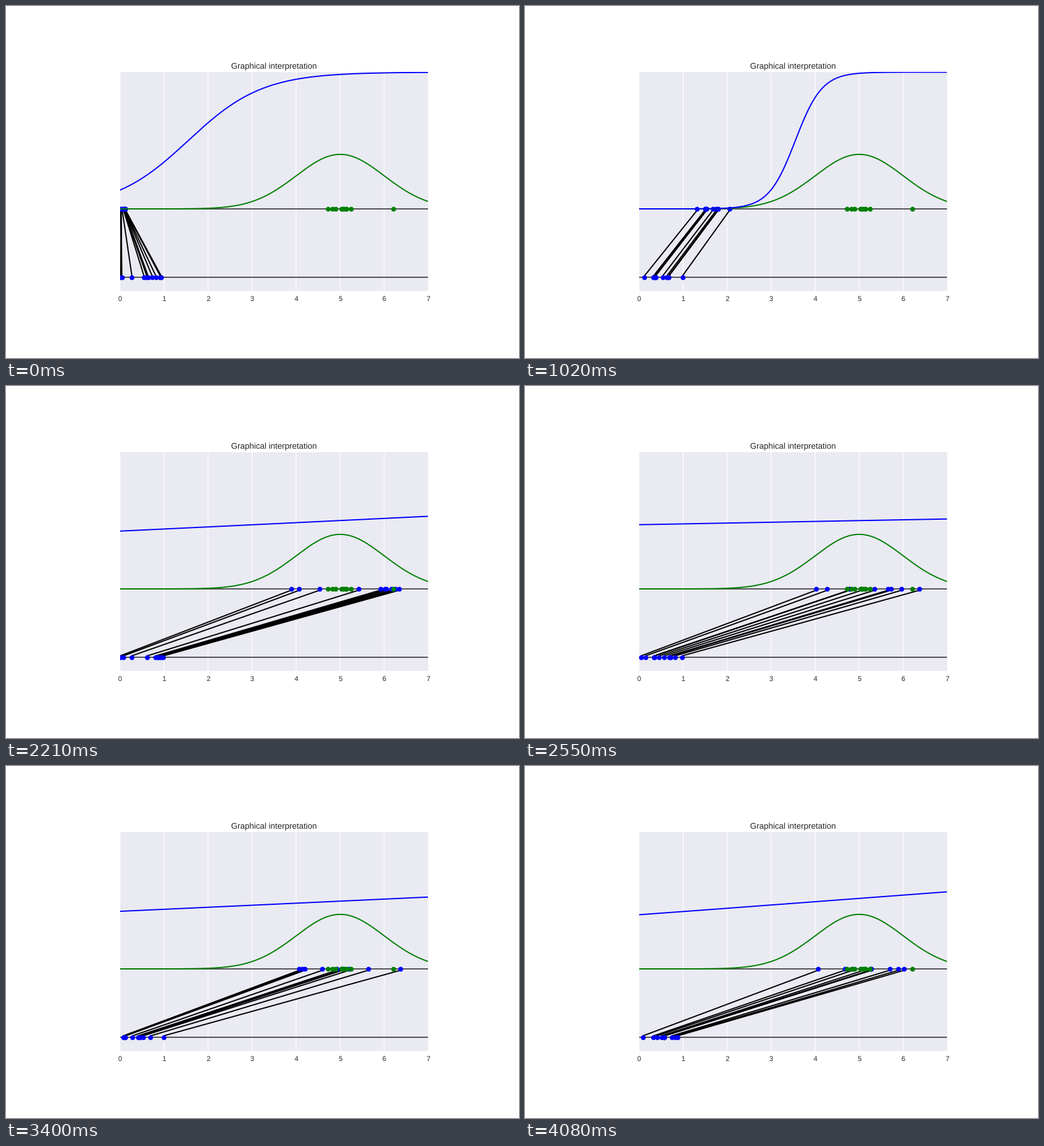
A matplotlib script that plays this animation: 800x550 px, repeating every 4.25 s.

```python
import numpy as np
import matplotlib.pyplot as plt
from matplotlib.animation import FuncAnimation

W, H, DPI = 800, 550, 100
FRAMES, STEP = 25, 170
LEFT, RIGHT, TOP, BOTTOM = 177.8, 658.5, 103.4, 445.2
LATENT_Y, GAP = -0.5, 0.01
SAMPLES = 10
BLUE, GREEN, INK = "#0000FF", "#008000", "0.15"

plt.rcParams["font.family"] = "Liberation Sans"
plt.rcParams["text.hinting"] = "none"


def pt(px):
    return px * 72 / DPI


def latent(step):
    return np.sort(np.random.default_rng(step).random(SAMPLES))


def generate(z, step):
    """Affine generator: climbs to the real data, then sways around it."""
    if step < 10:
        shift = np.interp(step, [0, 3, 6, 10], [0.02, 0.41, 1.215, 3.85])
    else:
        shift = 3.885 - 0.035 * np.cos(2 * np.pi * (step - 10) / 14)
    return shift + (0.1 + 0.62 * shift) * z


def discriminate(x, step):
    """Logistic curve: sharpens, chases the fakes, then goes nearly flat."""
    center = np.interp(step, [0, 3, 6, 10, 20, 24],
                       [1.55, 2.955, 3.55, 4.87, 5.3, 4.35])
    steepness = np.interp(step, [0, 3, 6, 8, 10, 15, 17, 20, 24],
                          [1.185, 3.25, 3.3, 2.7, 0.12, 0.024, 0.13, 0.06, 0.097])
    return 1 / (1 + np.exp(-steepness * (x - center)))


fig = plt.figure(figsize=(W / DPI, H / DPI), dpi=DPI, facecolor="white")
ax = fig.add_axes([LEFT / W, 1 - BOTTOM / H,
                   (RIGHT - LEFT) / W, (BOTTOM - TOP) / H])
ax.set_facecolor("#EAEAF2")
ax.patch.set_snap(False)
ax.set(xlim=(0, 7), ylim=(-0.6, 1), xticks=[], yticks=[])
ax.spines[:].set_visible(False)


def label(x, baseline, text, px):
    fig.text(x / W, 1 - baseline / H, text, size=pt(px), color=INK,
             ha="center", va="baseline")


def dots(x, y, color, z):
    return ax.plot(x, y, "o", color=color, ms=pt(7.6), mew=0, zorder=z)[0]


def curve(x, y, color, z):
    return ax.plot(x, y, color=color, lw=pt(1.9), zorder=z,
                   solid_capstyle="butt")[0]


label((LEFT + RIGHT) / 2, 98.2, "Graphical interpretation", 12.9)
for tick in range(8):
    label(LEFT + tick * (RIGHT - LEFT) / 7, 461.3, str(tick), 10.8)
    ax.axvline(tick, color="white", lw=pt(1.1), zorder=0.5, snap=False)
for y in (0, LATENT_Y):
    ax.axhline(y, color="black", lw=pt(1.25), zorder=1, snap=False)

x = np.linspace(0, 7, 400)
real = [4.72, 4.83, 4.89, 5.02, 5.05, 5.08, 5.13, 5.15, 5.25, 6.21]
links = curve([], [], "black", 2)
noise = dots([], [], BLUE, 3)
fakes = dots([], [], BLUE, 3)
dots(real, np.zeros(len(real)), GREEN, 4)
curve(x, np.exp(-(x - 5) ** 2 / 2) / np.sqrt(2 * np.pi), GREEN, 5)
score = curve([], [], BLUE, 6)


def draw(step):
    z = latent(step)
    g = generate(z, step)
    # NaN rows break the single line into separate links
    links.set_data(np.column_stack([g, z, z * np.nan]).ravel(),
                   np.tile([-GAP, LATENT_Y + GAP, np.nan], SAMPLES))
    noise.set_data(z, np.full(SAMPLES, LATENT_Y))
    fakes.set_data(g, np.zeros(SAMPLES))
    score.set_data(x, discriminate(x, step))
    return links, noise, fakes, score


anim = FuncAnimation(fig, draw, frames=FRAMES, interval=STEP,
                     init_func=lambda: draw(0), repeat=True, repeat_delay=0)
plt.show()
```
